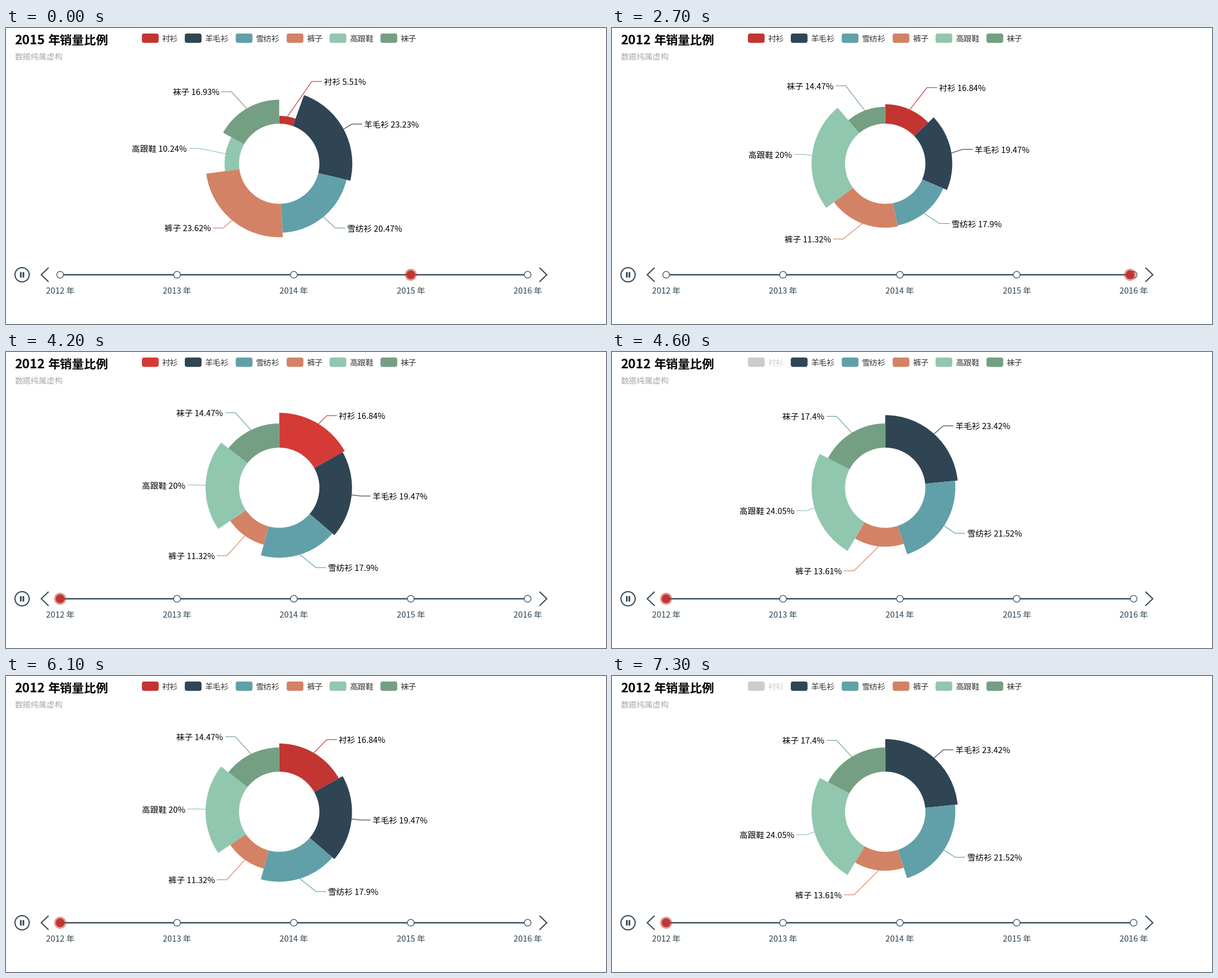
Recreate the animation shown at these times as a matplotlib script. Size 1064 px wide and 526 px high, loop 8 s.

```python
import numpy as np
import matplotlib.pyplot as plt
from matplotlib.animation import FuncAnimation
from matplotlib.patches import Circle, FancyBboxPatch, Rectangle, Wedge

W, H, DPI = 1064, 526, 100
STEP, LOOP = 100, 8000
K = 1.1884                      # chart zoom
CX, CY, R0, R1 = 484.5, 241.2, 71.25, 130.6
ARM, GAP = 15 * K, 3 * K        # label line segment, space before the text
LEAD, SPAN = 65, 300            # ms already elapsed at a change, ms of a tween
FONT = "Noto Sans CJK JP"
INK, OFF = "#304654", "#cccccc"
CJK, MIXED = 12 * K, 12.3 * K   # text sizes without and with digits

NAMES = ["衬衫", "羊毛衫", "雪纺衫", "裤子", "高跟鞋", "袜子"]
COLORS = ["#c23531", "#2f4554", "#61a0a8", "#d48265", "#91c7ae", "#749f83"]
HOT = "#d53a36"
YEARS = [2012, 2013, 2014, 2015, 2016]
SALES = {
    2012: [64, 74, 68, 43, 76, 55],
    2015: [14, 59, 52, 60, 26, 43],
    2016: [29, 60, 44, 85, 97, 26],
}
# start in ms, year, first slice shown
EVENTS = [(-1000, 2015, True), (700, 2016, True), (2700, 2012, True),
          (4300, 2012, False), (5800, 2012, True), (7000, 2012, False)]
HOVER = (3800, 4300)


def cubic_out(t):
    return 1 - (1 - t) ** 3


def quintic_in_out(t):
    return 16 * t ** 5 if t < 0.5 else 1 - 16 * (1 - t) ** 5


def elastic_out(t):
    return 1 if t >= 1 else 1 + 2 ** (-10 * t) * np.sin((t - 0.1) * 5 * np.pi)


def progress(ms, start):
    return min(1, (ms - start + LEAD) / SPAN)


def percents(values):
    """Two-digit shares that add up to 100 (largest remainder)."""
    exact = np.array(values) * 10000 / sum(values)
    units = np.floor(exact).astype(int)
    order = np.argsort(units - exact, kind="stable")
    units[order[:10000 - units.sum()]] += 1
    return [f"{u / 100:g}%" for u in units]


def layout(year, full):
    """Per slice: angles and radius, label line points, text."""
    sales = SALES[year] if full else [0] + SALES[year][1:]
    total, top = sum(sales), max(sales)
    slices, done = [], 0
    for name, v, share in zip(NAMES, sales, percents(sales)):
        if not v:
            slices.append(None)
            continue
        a0, a1 = (360 * s / total - 90 for s in (done, done + v))
        done += v
        r = R0 + (R1 - R0) * v / top
        mid = np.radians((a0 + a1) / 2)
        nx, ny = np.cos(mid), np.sin(mid)
        side = 1 if nx > 0 else -1
        dy = ny * (R1 + ARM)
        x = CX + side * np.sqrt((R1 + 2 * ARM) ** 2 - dy ** 2)
        line = [(CX + nx * r, CY + ny * r),
                (x - side * (GAP + ARM), CY + dy),
                (x - side * GAP, CY + dy), (x, CY + dy)]
        slices.append((np.array([a0, a1, r]), np.array(line),
                       f"{name} {share}"))
    return slices


LAYOUTS = [layout(year, full) for _, year, full in EVENTS]

fig = plt.figure(figsize=(W / DPI, H / DPI), dpi=DPI, facecolor="white")
ax = fig.add_axes([0, 0, 1, 1])
ax.set_xlim(0, W)
ax.set_ylim(H, 0)
ax.axis("off")


def pt(px):
    return px * 72 / DPI


def label(x, y, s, size=MIXED, **kw):
    return ax.text(x, y, s, fontsize=pt(size), family=FONT,
                   va="baseline", **kw)


def stroke(xs, ys, color=INK, width=2, **kw):
    return ax.plot(xs, ys, color=color, lw=pt(width), snap=False,
                   solid_capstyle="butt", solid_joinstyle="miter", **kw)[0]


title_year = label(15, 29, "", 22.8, weight="bold", color="black")
label(74.5, 29, "年销量比例", 18 * K, weight="bold", color="black")
label(15, 55.3, "数据纯属虚构", CJK, color="#aaaaaa")

# legend
icons, captions = [], []
x = 241
for name, color in zip(NAMES, COLORS):
    icon = FancyBboxPatch((x, 9.8), 25 * K, 14 * K, fc=color, lw=0,
                          boxstyle="round,pad=0,rounding_size=4")
    icons.append(ax.add_patch(icon))
    captions.append(label(x + 30 * K, 24, name, CJK, color="#333333"))
    x += (40 + 12 * len(name)) * K

# slices with their label lines
wedges, lines, texts = [], [], []
for i, color in enumerate(COLORS):
    wedges.append(ax.add_patch(Wedge((CX, CY), R1, 0, 1, fc=color, lw=0,
                                     zorder=4)))
    lines.append(stroke([], [], color, K, zorder=3))
    texts.append(label(0, 0, "", color="black", zorder=5,
                       ha="left" if i < 3 else "right"))

# timeline
AXIS_Y = 438.5
STOPS = dict(zip(YEARS, np.linspace(96, 925, len(YEARS))))
stroke([96, 925], [AXIS_Y] * 2, width=2 * K)
for year, x in STOPS.items():
    ax.add_patch(Circle((x, AXIS_Y), 5 * K, fc="white", ec=INK, lw=pt(K),
                        zorder=3))
    label(x, 472.3, f"{year} 年", ha="center", color=INK)
ax.add_patch(Circle((28.5, AXIS_Y), 12.6, fc="none", ec=INK, lw=pt(2)))
for x in (24.8, 29.4):
    ax.add_patch(Rectangle((x, 433.7), 2.9, 9.8, fc=INK, lw=0, snap=False))
for tip, back in ((62.5, 75.5), (959, 946)):
    stroke([back, tip, back], [426, AXIS_Y, 451])
dot = [ax.add_patch(Circle((0, AXIS_Y), 6.5 * K, fc=COLORS[0], lw=0,
                           zorder=6)),
       ax.add_patch(Circle((0, AXIS_Y), 6.5 * K, fc="none", lw=pt(5 * K),
                           ec=(194 / 255, 53 / 255, 49 / 255, 0.5),
                           zorder=7))]


def mix(a, b, p):
    return a + (b - a) * p


def update(n):
    ms = n * STEP
    now = max(i for i, e in enumerate(EVENTS) if e[0] <= ms)
    old = max(now - 1, 0)
    start, year, full = EVENTS[now]
    t = progress(ms, start)
    p = cubic_out(t)
    hover = HOVER[0] <= ms < HOVER[1]

    title_year.set_text(str(year))
    spot = mix(STOPS[EVENTS[old][1]], STOPS[year], quintic_in_out(t))
    for c in dot:
        c.set_center((spot, AXIS_Y))

    red = HOT if hover else COLORS[0]
    icons[0].set_facecolor(red if full else OFF)
    captions[0].set_color("#333333" if full else OFF)
    wedges[0].set_facecolor(red)

    for i, (wedge, line, text) in enumerate(zip(wedges, lines, texts)):
        part, prev = LAYOUTS[now][i], LAYOUTS[old][i]
        for artist in (wedge, line, text):
            artist.set_visible(part is not None)
        if part is None:
            continue
        shape, points, caption = part
        if prev is None:        # a returning slice opens from its start angle
            a0, a1, r = shape
            a1 = mix(a0, a1, p)
        else:
            a0, a1, r = mix(prev[0], shape, p)
            points = mix(prev[1], points, p)
        if hover and i == 0:
            r += 10 * K * elastic_out(progress(ms, HOVER[0]))
        wedge.set(radius=r, width=r - R0, theta1=a0, theta2=a1)
        line.set_data(points[:3, 0], points[:3, 1])
        text.set_position((points[3, 0], points[3, 1] + 6))
        text.set_text(caption)
    return [title_year, *dot, *icons, *captions, *wedges, *lines, *texts]


anim = FuncAnimation(fig, update, frames=LOOP // STEP, interval=STEP,
                     repeat=True, repeat_delay=0, blit=False)
plt.show()
```
